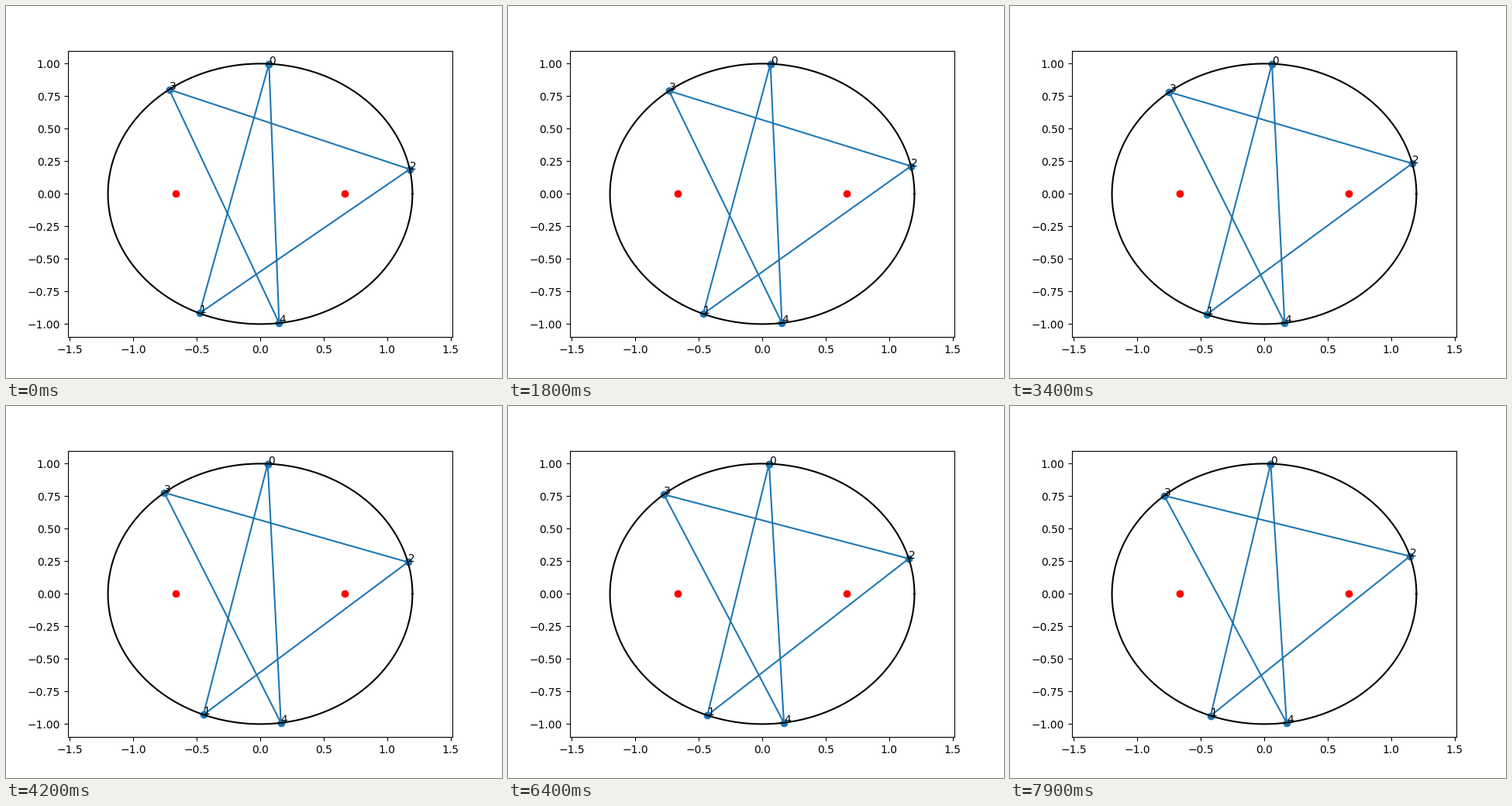
Recreate the animation shown at these times as a matplotlib script. Size 640 by 480 pixels, loop 8000 ms.

```python
import numpy as np
import matplotlib.pyplot as plt
from matplotlib.animation import FuncAnimation

A, B = 1.2, 1.0
FRAMES, INTERVAL = 80, 100
START, STEP = 2.2116, 0.00096  # eccentric angle of vertex 3 and its rate
FREE = [0, 1, 2, 4]
GUESS = np.array([1.51, -1.98, 0.19, 2.21, -1.45])


def on_ellipse(t):
    return np.column_stack([A * np.cos(t), B * np.sin(t)])


def star(t3):
    """Equilateral five-pointed star in the ellipse, vertex 3 given (Newton)."""
    t, side = GUESS.copy(), 1.99
    t[3] = t3
    for _ in range(12):
        p = on_ellipse(t)
        tangent = np.column_stack([-A * np.sin(t), B * np.cos(t)])
        jac = np.zeros((5, 6))
        gap = np.zeros(5)
        for i in range(5):
            j = (i + 1) % 5
            d = p[j] - p[i]
            length = np.hypot(*d)
            jac[i, i] = -d @ tangent[i] / length
            jac[i, j] = d @ tangent[j] / length
            jac[i, 5] = -1
            gap[i] = length - side
        delta = np.linalg.solve(jac[:, FREE + [5]], -gap)
        t[FREE] += delta[:4]
        side += delta[4]
    return on_ellipse(t)


fig, ax = plt.subplots(figsize=(6.4, 4.8), dpi=100)
ax.set_xlim(-1.515, 1.515)
ax.set_ylim(-1.1, 1.1)

path, = ax.plot([], [], "o-", color="C0")
focus = np.sqrt(A**2 - B**2)
ax.plot([-focus, focus], [0, 0], "ro")
ax.plot(*on_ellipse(np.linspace(0, 2 * np.pi, 1000)).T, "k")
labels = [ax.text(0, 0, str(i)) for i in range(5)]


def update(n):
    p = star(START + STEP * n)
    path.set_data(*np.vstack([p, p[:1]]).T)
    for label, point in zip(labels, p):
        label.set_position(point)
    return [path, *labels]


anim = FuncAnimation(fig, update, frames=FRAMES, interval=INTERVAL,
                     init_func=lambda: update(0), repeat=True, repeat_delay=0)
plt.show()
```
